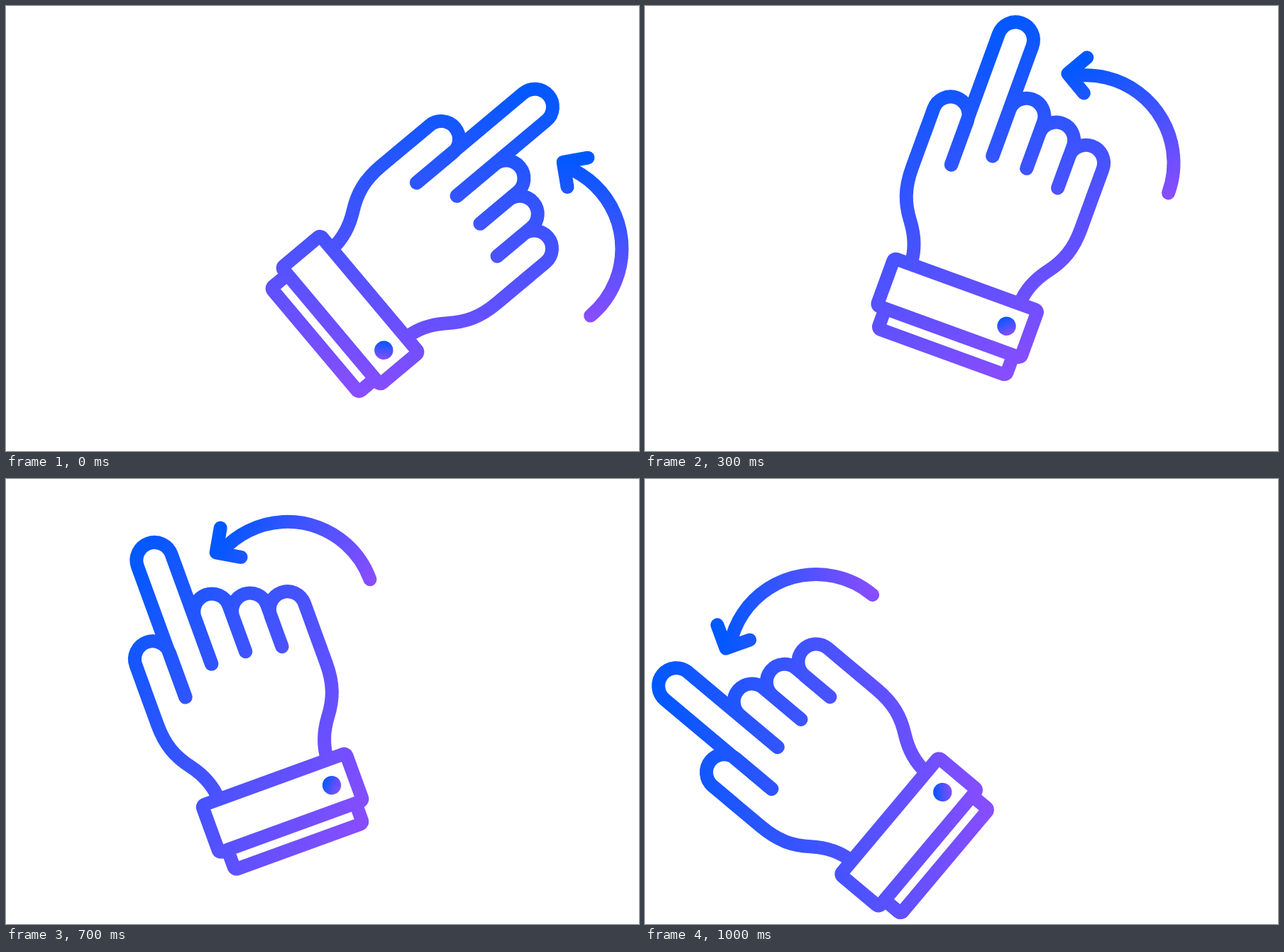
These frames come from a looping animation (892x628 px, 2500 ms). An HTML page with a canvas:

```html
<!DOCTYPE html>
<html lang="en">
<head>
<meta charset="utf-8">
<title>Turning hand</title>
<style>
  html, body { margin: 0; width: 100%; height: 100%; overflow: hidden; background: #fff; }
  canvas { display: block; }
</style>
</head>
<body>
<canvas id="stage" width="892" height="628"></canvas>
<script>
const ctx = document.getElementById('stage').getContext('2d');
const LOOP = 2500, STEP = 100, LAST = 10;
const PIVOT = { x: 457.4, y: 511.3 };
const LINE = 19, R = 25.3;
const MID = -46.4; // symmetry axis of the palm

// All shapes are drawn upright, relative to the pivot.
function diagonal(x, y, len) {
  const g = ctx.createLinearGradient(x, y, x + len, y + len);
  g.addColorStop(0, '#0058ff');
  g.addColorStop(1, '#8a4dff');
  return g;
}

// A finger: rounded tip with two sides that end at the given heights.
function finger(path, x, y, leftEnd, rightEnd) {
  path.moveTo(x - R, leftEnd);
  path.lineTo(x - R, y);
  path.arc(x, y, R, Math.PI, 0);
  path.lineTo(x + R, rightEnd);
}

// Palm edge from the knuckle to the cuff; side is -1 or 1.
function palmEdge(path, side) {
  const px = d => MID + side * d;
  path.moveTo(px(126.6), -300);
  path.lineTo(px(126.6), -238);
  path.bezierCurveTo(px(126.6), -207, px(118.6), -187, px(103.2), -166.7);
  path.bezierCurveTo(px(90.6), -150, px(82.6), -133, px(81.6), -110);
}

function makeHand() {
  const p = new Path2D();
  finger(p, -147.6, -327.3, -290, -261);
  finger(p, -97.6, -457.5, -261, -292.5);
  finger(p, -46.4, -361.7, -292.5, -292.5);
  finger(p, 4.5, -344.2, -292.5, -281.5);
  finger(p, 54.9, -328.3, -281.5, -290);
  palmEdge(p, -1);
  palmEdge(p, 1);
  p.roundRect(-153, -109.5, 215.5, 71, 4);
  p.moveTo(-140.5, -38.5);
  p.arcTo(-140.5, -8.5, 0, -8.5, 4);
  p.arcTo(51.5, -8.5, 51.5, -38.5, 4);
  p.lineTo(51.5, -38.5);
  return p;
}

function makeArrow() {
  const p = new Path2D();
  p.arc(54.9, -328.3, 123.7, -118 * Math.PI / 180, 0);
  p.moveTo(5.4, -468.7);
  p.lineTo(-12.2, -438.1);
  p.lineTo(18.5, -420);
  return p;
}

const hand = makeHand(), arrow = makeArrow();
const button = new Path2D();
button.arc(28.6, -73.8, 13.2, 0, 2 * Math.PI);

const handInk = diagonal(-302, -302, 332);
const arrowInk = diagonal(-230, -230, 160);
const buttonInk = diagonal(19, -83.4, 19.2);

function draw(time) {
  const step = Math.min(LAST, Math.floor((time % LOOP) / STEP));
  ctx.setTransform(1, 0, 0, 1, 0, 0);
  ctx.fillStyle = '#fff';
  ctx.fillRect(0, 0, 892, 628);

  ctx.translate(PIVOT.x, PIVOT.y);
  ctx.rotate((50 - 10 * step) * Math.PI / 180);
  ctx.lineWidth = LINE;
  ctx.lineCap = ctx.lineJoin = 'round';
  ctx.strokeStyle = handInk;
  ctx.stroke(hand);
  ctx.strokeStyle = arrowInk;
  ctx.stroke(arrow);
  ctx.fillStyle = buttonInk;
  ctx.fill(button);
}

const start = performance.now();
function tick() {
  draw(performance.now() - start);
  requestAnimationFrame(tick);
}
tick();
</script>
</body>
</html>
```
